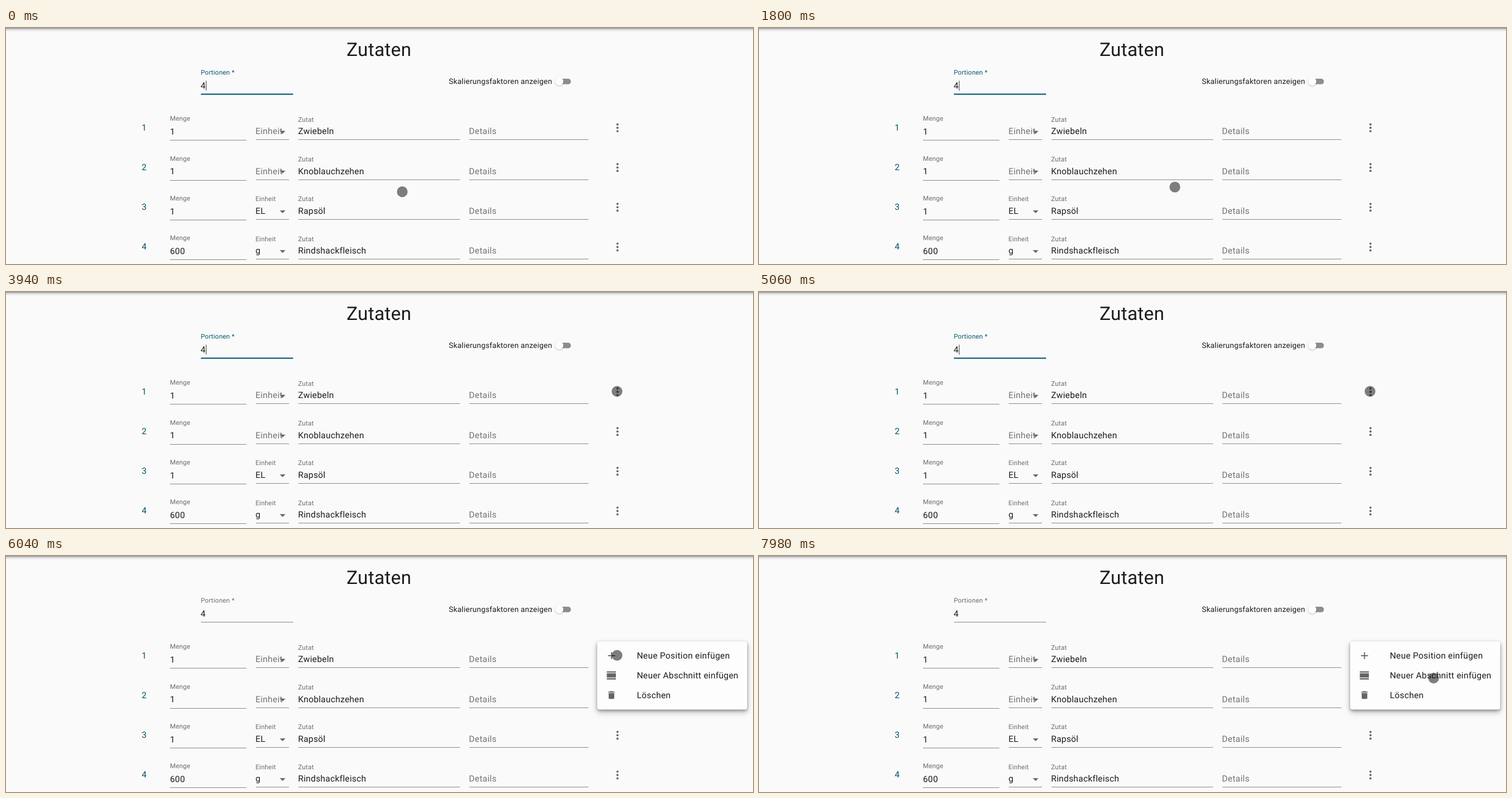
Animation of 1280 by 405 pixels, one loop 8 s. Source, as an HTML page:

```html
<!DOCTYPE html>
<html lang="de">
<head>
<meta charset="utf-8">
<title>Zutaten</title>
<style>
html, body { margin: 0; width: 100%; height: 100%; overflow: hidden; background: #fafafa; }
svg { display: block; width: 100%; height: 100%; }
text { font: 14.86px Roboto, sans-serif; letter-spacing: .0179em; fill: #1c1c1e; white-space: pre; text-rendering: geometricPrecision; }
.title { font-size: 32px; letter-spacing: .0073em; }
.label { font-size: 11.14px; fill: #6b6b6e; }
.small { font-size: 13px; }
.hint { fill: #727274; }
.accent { fill: #00546a; }
.line { fill: #8c8c8e; shape-rendering: crispEdges; }
.icon { fill: #646466; }
.menu { fill: #fdfdfd; filter: drop-shadow(0 2px 2px rgba(0,0,0,.3)) drop-shadow(0 4px 5px rgba(0,0,0,.26)); }
.thumb { fill: #fdfdfd; filter: drop-shadow(0 1px 1px rgba(0,0,0,.25)); }
</style>
</head>
<body>
<svg viewBox="0 0 1280 405" preserveAspectRatio="none">
  <defs>
    <linearGradient id="shade" x2="0" y2="1">
      <stop stop-color="#88888c"/>
      <stop offset=".3" stop-color="#cfcfd2"/>
      <stop offset="1" stop-color="#fafafa"/>
    </linearGradient>
  </defs>
  <rect width="1280" height="405" fill="#fafafa"/>
  <rect width="1280" height="6" fill="url(#shade)"/>
  <text class="title" x="583.5" y="48.3">Zutaten</text>

  <text id="portLabel" class="label" x="333.7" y="80">Portionen *</text>
  <text x="333.5" y="104.3">4</text>
  <rect class="line" x="334" y="113.2" width="158" height="1"/>
  <rect id="focus" class="accent" y="112.6" height="2"/>
  <rect id="caret" x="342.5" y="90.5" width="1" height="17" fill="#333"/>

  <text class="small" x="758.7" y="96.4">Skalierungsfaktoren anzeigen</text>
  <rect x="943" y="87" width="25" height="9.6" rx="4.8" fill="#8c8c8e"/>
  <circle class="thumb" cx="948" cy="91.8" r="7"/>

  <g id="rows"></g>

  <g id="menu">
    <rect class="menu" x="1013" y="146.5" width="257" height="117" rx="3.7"/>
    <path class="icon" d="M1036.7 165h1.7v5.2h5.2v1.7h-5.2v5.2h-1.7v-5.2h-5.2v-1.7h5.2z"/>
    <path class="icon" d="M1029.5 198h15.5v2.1h-15.5zM1029.5 201.3h15.5v7.2h-15.5zM1029.5 209.8h15.5v2.1h-15.5z"/>
    <path class="icon" d="M1032 232.7h2.8l.8-.8h3.8l.8.8h2.8v1.6h-11zM1032.7 235.2h9.6v8.4q0 1.6-1.6 1.6h-6.4q-1.6 0-1.6-1.6z"/>
    <text x="1081" y="175.6">Neue Position einfügen</text>
    <text x="1081" y="209.7">Neuer Abschnitt einfügen</text>
    <text x="1081" y="244">Löschen</text>
  </g>
  <circle id="cursor" r="9.2" fill="#000" fill-opacity=".5"/>
</svg>
<script>
const LOOP = 8000, PITCH = 68.2;
const $ = id => document.getElementById(id);
const clamp = v => Math.max(0, Math.min(1, v));
const progress = (t, start, length) => clamp((t - start) / length);

const text = (x, y, s, cls = '') => `<text class="${cls}" x="${x}" y="${y}">${s}</text>`;
const line = (x, y, end) => `<rect class="line" x="${x}" y="${y}" width="${end - x}" height="1"/>`;
const dot = y => `<circle class="icon" cx="1047.8" cy="${y}" r="1.85"/>`;

const row = ([amount, unit, name], i) => `<g transform="translate(0 ${i * PITCH})">` +
  text(232.5, 175.6, i + 1, 'accent') +
  text(281, 159.4, 'Menge', 'label') + text(281, 183.2, amount) + line(281, 192.4, 412) +
  (unit ? text(427.5, 161, 'Einheit', 'label') + text(427.5, 182.4, unit)
        : text(427.5, 182.4, 'Einheit', 'hint')) + line(428, 191.4, 485) +
  '<path class="icon" d="M469.2 176.6h9.6l-4.8 4.8z"/>' +
  text(500.5, 161, 'Zutat', 'label') + text(500.5, 182.4, name) + line(500.5, 191.4, 778) +
  text(793.3, 182.4, 'Details', 'hint') + line(793.5, 191.4, 998) +
  [165.4, 171.2, 177].map(dot).join('') + '</g>';

$('rows').innerHTML = [
  ['1', '', 'Zwiebeln'],
  ['1', '', 'Knoblauchzehen'],
  ['1', 'EL', 'Rapsöl'],
  ['600', 'g', 'Rindshackfleisch']
].map(row).join('');

// Pointer stops: time, x, y
const stops = [
  [1700, 679, 281], [2280, 1097, 180], [2640, 1069, 173], [3140, 1047, 170.5],
  [6560, 1047, 170.5], [6960, 1188, 212], [7320, 1156, 209.5]
];

function pointer(t) {
  const next = stops.findIndex(s => s[0] > t);
  if (next < 0) return stops[stops.length - 1].slice(1);
  if (next === 0) return stops[0].slice(1);
  const [t0, x0, y0] = stops[next - 1], [t1, x1, y1] = stops[next];
  const p = (t - t0) / (t1 - t0), e = p * p * (3 - 2 * p);
  return [x0 + (x1 - x0) * e, y0 + (y1 - y0) * e];
}

function draw(t) {
  const focused = t < 5150;
  const width = 158 * (1 - progress(t, 5150, 300)) ** 3;
  $('focus').setAttribute('x', 413 - width / 2);
  $('focus').setAttribute('width', width);
  $('portLabel').style.fill = focused ? '#00546a' : '';
  $('caret').style.display = focused ? '' : 'none';

  const scale = 1 - .2 * (1 - progress(t, 5220, 120)) ** 2;
  $('menu').setAttribute('opacity', progress(t, 5230, 100));
  $('menu').setAttribute('transform', `translate(1013 146.5) scale(${scale}) translate(-1013 -146.5)`);

  const [x, y] = pointer(t);
  $('cursor').setAttribute('cx', x);
  $('cursor').setAttribute('cy', y);
  $('cursor').style.display = t >= 5150 && t < 5480 ? 'none' : '';
}

const begin = performance.now();
function tick() {
  draw((performance.now() - begin) % LOOP);
  requestAnimationFrame(tick);
}
tick();
</script>
</body>
</html>
```
